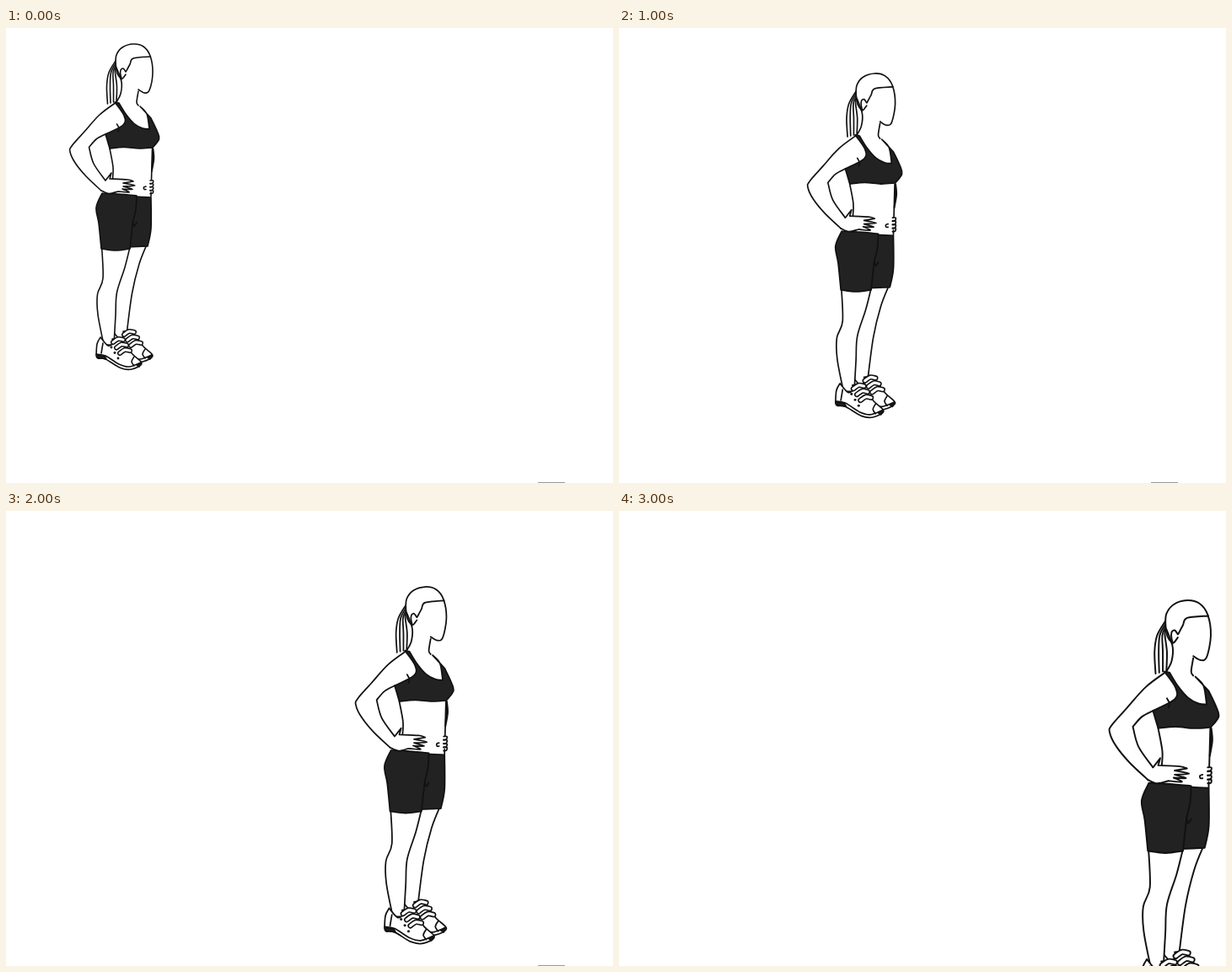
These frames come from a looping animation (720x540 px, 3.5 s). An HTML page:

```html
<!DOCTYPE html>
<html lang="en">
<head>
<meta charset="utf-8">
<title>Walking lunges</title>
<style>
  html, body { margin: 0; width: 100%; height: 100%; overflow: hidden; background: #fff; }
  svg { display: block; width: 100%; height: 100%; }
  path { stroke: #111; stroke-linecap: round; stroke-linejoin: round; }
  .line { fill: none; }
  .skin { fill: #fff; }
  .cloth { fill: #222; }
  .pose { visibility: hidden; animation: show 3.5s step-end infinite; }
  @keyframes show {
    0% { visibility: visible; }
    14.285714%, 100% { visibility: hidden; }
  }
</style>
</head>
<body>
<svg id="stage" viewBox="0 0 720 540" stroke-width="1.6"></svg>
<script>
(() => {
  // Smooth curve through "x,y" points; "/" marks a corner.
  function curve(text) {
    let last = null, d = '';
    for (const part of text.split('/')) {
      const p = part.trim().split(/\s+/).map(s => s.split(',').map(Number));
      if (last) p.unshift(last);
      else d = 'M' + p[0];
      for (let i = 0; i < p.length - 1; i++) {
        const a = p[i - 1] || p[i], b = p[i], c = p[i + 1], e = p[i + 2] || c;
        const h1 = b.map((v, k) => (v + (c[k] - a[k]) / 6).toFixed(2));
        const h2 = c.map((v, k) => (v - (e[k] - b[k]) / 6).toFixed(2));
        d += `C${h1} ${h2} ${c}`;
      }
      last = p[p.length - 1];
    }
    return d;
  }
  const draw = (cls, shapes) => shapes.map(s => `<path class="${cls}" d="${curve(s)}"/>`).join('');
  const line = (...s) => draw('line', s);
  const skin = (...s) => draw('skin', s);
  const cloth = (...s) => draw('cloth', s);
  const repeat = (n, make) => Array.from({ length: n }, (_, i) => make(i)).join('');
  const group = (body, transform) => `<g transform="${transform}">${body}</g>`;
  const place = (body, scale, x, y) => group(body, `translate(${x} ${y}) scale(${scale})`);
  const dot = (x, y) => `<circle cx="${x}" cy="${y}" r="1.4" fill="#111"/>`;

  const ponytail =
    repeat(4, i => line(`130,${39 + 3 * i} ${122 + 2.5 * i},53 ${119.5 + 4 * i},69 ${120.5 + 3.5 * i},${90 - i}`)) +
    line('131,47 137,64 136,78 131,88');

  const head = line(
    '130,43 131,32 138,23 151,19 163,22 171,33 174,53 170,74 164,77 157,73',
    '171.5,34 151,36 147,43 142.5,51.5',
    '142,52 139,48 136,50 136,56 138,60 142,55',
    '130,42 132,54 137,61',
    '157,75 155,88 157,92');

  const bra = cloth(
    '129,88 140,104 139,115 118,126 / 123,143 / 140,141.5 158,143 174,142 / ' +
    '181.5,132 179.5,123 172,107 / 159,93 / 167,102 170,120 / 162,119 152,113.5 142,102 134,89 / 129,88');

  const navel = x => line(`${x + 1},188 ${x - 1.5},189 ${x - 1},191.5 ${x + 1},191.5`);
  const bust = ponytail + head + bra + line('123,143 127,165 126.5,179');
  const farHand = repeat(4, i => {
    const y = 181 + 4 * i;
    return skin(`171,${y} 174.5,${y} 174,${y + 3} 171,${y + 3.5}`);
  });
  const frontTorso = bust + navel(165) + farHand +
    line('173.5,143 172.5,180', '172,195 172,200') + cloth('174.5,143 175.5,155 173,170 / 174.5,143');
  const turnedTorso = bust + navel(156) + line('175,143 173,156 166,185');

  const arm =
    line('131,88 111,103 93,123 78,140 76,147 82,160 95,176 113,193',
      '118,126 107,132 98.5,141.5 / 104,161 118,181',
      '131.5,114 134,119 133,123') +
    skin('118,181 125,172 / 123,179 / 144,180 151,182 / 139,184 / 153,187 139,188 / ' +
      '150,191.5 138,191 / 146,195 133,194 / 122,196.5 113,193');

  const shoe =
    skin('112,367 108,375 107,389 / 109,392 118,393 136,403.5 149,405 161,398 150,387 136,370 126,369 / ' +
      '127,374 121,377 112,367') +
    line('107,387 118,389 134,399 146,402 160,397', '115,374 113,386', '152,390 149,396 152,401') +
    cloth('108,388 / 117,389.5 / 119,393 / 109,391 / 108,388', '155,400 / 160,397 / 158,402 / 155,400') +
    repeat(3, i => {
      const x = 127 + 4 * i, y = 373 + 6.5 * i;
      const d = curve(`${x},${y} ${x + 6},${y - 4} ${x + 12},${y - 3}`);
      return `<path class="line" stroke-width="6" d="${d}"/>` +
        `<path class="line" style="stroke:#fff" stroke-width="3" d="${d}"/>` + dot(x - 2, y + 6);
    });

  const raisedShoe =
    skin('137,357 151,358 156,362 / 147,372 148,381 / 157,382 161,400 / 157,405 149,403 140,396 135,381 137,357') +
    line('140,357 138.5,368 145,394 154,402', '147,373 144,383 146,392') +
    cloth('136,359 / 139,358 / 138.5,369 / 135,369 / 136,359', '152,402 / 160,400 / 157,404 / 152,402') +
    repeat(4, i => line(`${143 + 1.5 * i},${382 + 4.5 * i} ${151 + i},${386 + 4 * i} ${158 + i},${384 + 4 * i}`) +
      dot(143 + 1.5 * i, 383 + 4 * i));

  const standing = frontTorso +
    skin('120,255 / 120,371 / 142,371 / 143,364 149.5,315 158,280 167,257') +
    place(shoe, 1, 13, -9) +
    skin('113.5,258 / 115,297 108.5,316 109,340 116,376 / 128,376 / 130,341 131.5,314 141,284 148,256') +
    shoe +
    cloth('145,260 168,259 / 172,238 172,201 / 152,200 / 145,260',
      '114,196 107,213 110,232 113,262 / 130,264 147,262 / 150.5,230 / 154,215 155,199 / 134,197 114,196') +
    line('150.5,230 152,235 155,231') + arm;

  const nearLunge = place(frontTorso, 1.007, 81.5, 119) +
    skin('148,366 156,364 182,371 209,385 / 209,360 / 244,360 / 244,374 228,409 216,415 188,402 158,382 148,381') +
    raisedShoe +
    cloth('208,352 209,373 / 226,376 243,374 / 244,360 / 208,352') +
    skin('249,322 / 275,326 298,335 307,347 304,367 287,428 / 268,428 / 269,391 280,362 / 260,361 241,363 / 249,322') +
    place(shoe, 1.057, 143.7, 33.9) +
    cloth('195,314 191,336 217,359 242,362 / 245,342 253,323 / 234,319 195,314') +
    place(arm, 1.007, 81.5, 119);

  const farLunge = place(turnedTorso, 1.088, 263.3, 143.3) +
    skin('309,423 318,422 346,433 379,443 / 377,412 / 416,412 / 408,446 398,464 382,468 350,460 308,433') +
    group(raisedShoe, 'translate(303 435) rotate(15) scale(1.1) translate(-147 -380.5)') +
    skin('468,352 / 494,361 513,376 514,391 494,447 490,474 / 471,474 / 480,412 488,397 / 477,391 456,391 / 468,352') +
    line('480,393 489,396 484,401') +
    group(shoe, 'translate(334.2 107) scale(1.167 .975)') +
    cloth('381,352 374,390 377,416 / 395,421 415,419 / 421,387 / 440,388 457,391 / ' +
      '460,371 471,353 / 458,347 446,345 / 425,359 400,359 381,352') +
    line('421,383 422,388 426,384') +
    place(arm, 1.088, 263.3, 143.3);

  const poses = [
    standing,
    nearLunge,
    place(standing, 1.057, 143.7, 33.9),
    farLunge,
    place(standing, 1.096, 331.7, 69.2),
    place(nearLunge, 1.149, 323.5, 46),
    place(standing, 1.224, 489, 82.8),
  ];

  document.getElementById('stage').innerHTML =
    '<rect x="631" y="539" width="32" height="1" fill="#999"/>' +
    poses.map((p, i) => `<g class="pose" style="animation-delay:${i / 2 - 3.5}s">${p}</g>`).join('');
})();
</script>
</body>
</html>
```
